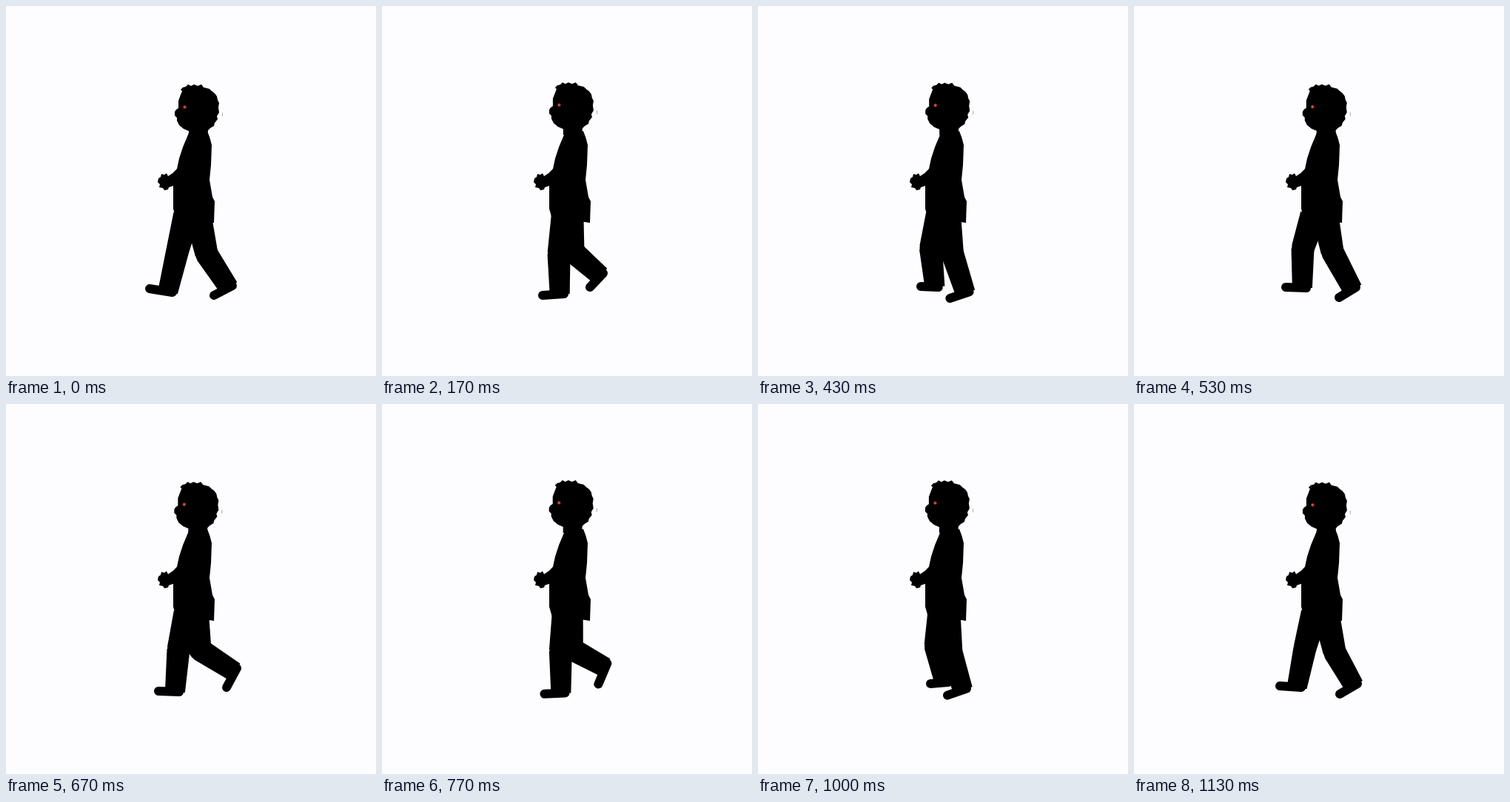
Recreate the animation shown at these times as an HTML page with a canvas. Size 500 px wide and 500 px high, loop 1160 ms.

```html
<!DOCTYPE html>
<html lang="en">
<head>
<meta charset="utf-8">
<title>Walking silhouette</title>
<style>
  html, body { margin: 0; height: 100%; overflow: hidden; background: #fdfdff; }
  canvas { display: block; }
</style>
</head>
<body>
<canvas id="stage" width="500" height="500"></canvas>
<script>
const ctx = document.getElementById('stage').getContext('2d');
const LOOP = 1160, STEPS = 35;

const head = new Path2D(`M236 120 L238 115 L236 113 L239 110 L243 109 L246 106 L250 108 L254 106
  L259 108 L264 106 L267 110 L271 111 L275 112 L278 115 L282 118 L285 122 L286 127 L288 131 L287 137
  L288 144 L285 149 L286 153 L282 158 L281 162 L276 165 L273 168 L272 177 L247 177 L247 169 L240 166
  L234 161 L231 155 L231 151 L228 148 L228 143 L230 140 L233 138 L233 128 Z`);
const torso = new Path2D(`M248 168 L272 169 Q276 178 278 188 L277 215 L275 235 L279 258 L282 264
  L281 293 L262 290 L230 288 L226 274 L226 243 L220 245 L219 248 L214 249 L212 246 L207 245 L208 241
  L205 238 L206 233 L209 231 L210 227 L214 228 L217 226 L219 230 L225 226 L231 220 L234 206
  Q239 189 246 174 Z`);

// Pose rows: step, knee x y, heel x y, toe x y
const nearLeg = [
  [0, 232, 330, 225, 387, 194, 382],
  [1, 232, 331, 225, 388, 192, 384],
  [5, 239, 335, 246, 389, 217, 391],
  [10, 254, 335, 270, 389, 242, 394],
  [16, 268, 332, 300, 380, 277, 394],
  [20, 262, 332, 312, 357, 298, 383],
  [26, 250, 330, 290, 351, 277, 376],
  [30, 240, 327, 257, 376, 233, 378],
  [34, 231, 330, 226, 383, 197, 381]
];
const farLeg = [
  [0, 271, 335, 306, 378, 281, 391],
  [2, 267, 333, 308, 369, 287, 388],
  [5, 258, 332, 299, 361, 281, 380],
  [10, 241, 328, 258, 378, 238, 379],
  [16, 228, 328, 233, 381, 205, 380],
  [18, 230, 330, 229, 386, 199, 384],
  [20, 233, 332, 234, 389, 206, 388],
  [26, 250, 335, 262, 390, 234, 394],
  [34, 271, 335, 302, 378, 278, 392]
];

// Smooth periodic interpolation through the pose rows
function poseAt(rows, step) {
  const n = rows.length;
  const row = i => rows[(i + n) % n];
  const at = i => row(i)[0] + Math.floor(i / n) * STEPS;
  let i = n - 1;
  while (rows[i][0] > step) i--;
  const span = at(i + 1) - at(i), u = (step - at(i)) / span;
  const slope = (j, c) => (row(j + 1)[c] - row(j - 1)[c]) / (at(j + 1) - at(j - 1)) * span;
  return [1, 2, 3, 4, 5, 6].map(c => {
    const a = row(i)[c], b = row(i + 1)[c], ma = slope(i, c), mb = slope(i + 1, c);
    return a + u * (ma + u * (3 * (b - a) - 2 * ma - mb + u * (2 * (a - b) + ma + mb)));
  });
}

function dot(x, y, r) {
  ctx.beginPath();
  ctx.arc(x, y, r, 0, 7);
  ctx.fill();
}

function limb(ax, ay, ra, bx, by, rb) {
  const len = Math.hypot(bx - ax, by - ay);
  const nx = (by - ay) / len, ny = (ax - bx) / len;
  ctx.beginPath();
  ctx.moveTo(ax + nx * ra, ay + ny * ra);
  ctx.lineTo(bx + nx * rb, by + ny * rb);
  ctx.lineTo(bx - nx * rb, by - ny * rb);
  ctx.lineTo(ax - nx * ra, ay - ny * ra);
  ctx.fill();
}

function drawLeg([kx, ky, hx, hy, tx, ty]) {
  const hipX = 252 + 0.4 * (kx - 252);
  limb(hipX, 283, 18, kx, ky, 15.5);
  dot(kx, ky, 15);
  limb(kx, ky, 15.5, hx + 0.2 * (tx - hx), hy + 0.2 * (ty - hy), 13.5);
  ctx.beginPath();
  ctx.moveTo(hx, hy);
  ctx.lineTo(tx, ty);
  ctx.stroke();
}

function drawHead(step) {
  const lift = Math.min(1, 1.5 * Math.sin(2 * Math.PI * step / STEPS) ** 2);
  ctx.save();
  ctx.translate(-2.3 * lift, -3 * lift);
  ctx.fill(head);
  ctx.fillStyle = '#5a1a10';
  dot(241.5, 136.5, 2.6);
  ctx.fillStyle = '#d8503a';
  dot(241.5, 136.5, 1.6);
  ctx.fillStyle = '#aaa';
  ctx.fillRect(292, 144, 1, 5);
  ctx.restore();
}

function draw() {
  const frame = Math.floor((performance.now() % LOOP + 4) / LOOP * STEPS) % STEPS;
  ctx.fillStyle = '#fdfdff';
  ctx.fillRect(0, 0, 500, 500);
  ctx.fillStyle = ctx.strokeStyle = '#000';
  ctx.lineWidth = 12;
  ctx.lineCap = 'round';
  drawLeg(poseAt(farLeg, frame));
  drawLeg(poseAt(nearLeg, frame));
  ctx.fill(torso);
  drawHead(frame);
  requestAnimationFrame(draw);
}
draw();
</script>
</body>
</html>
```
